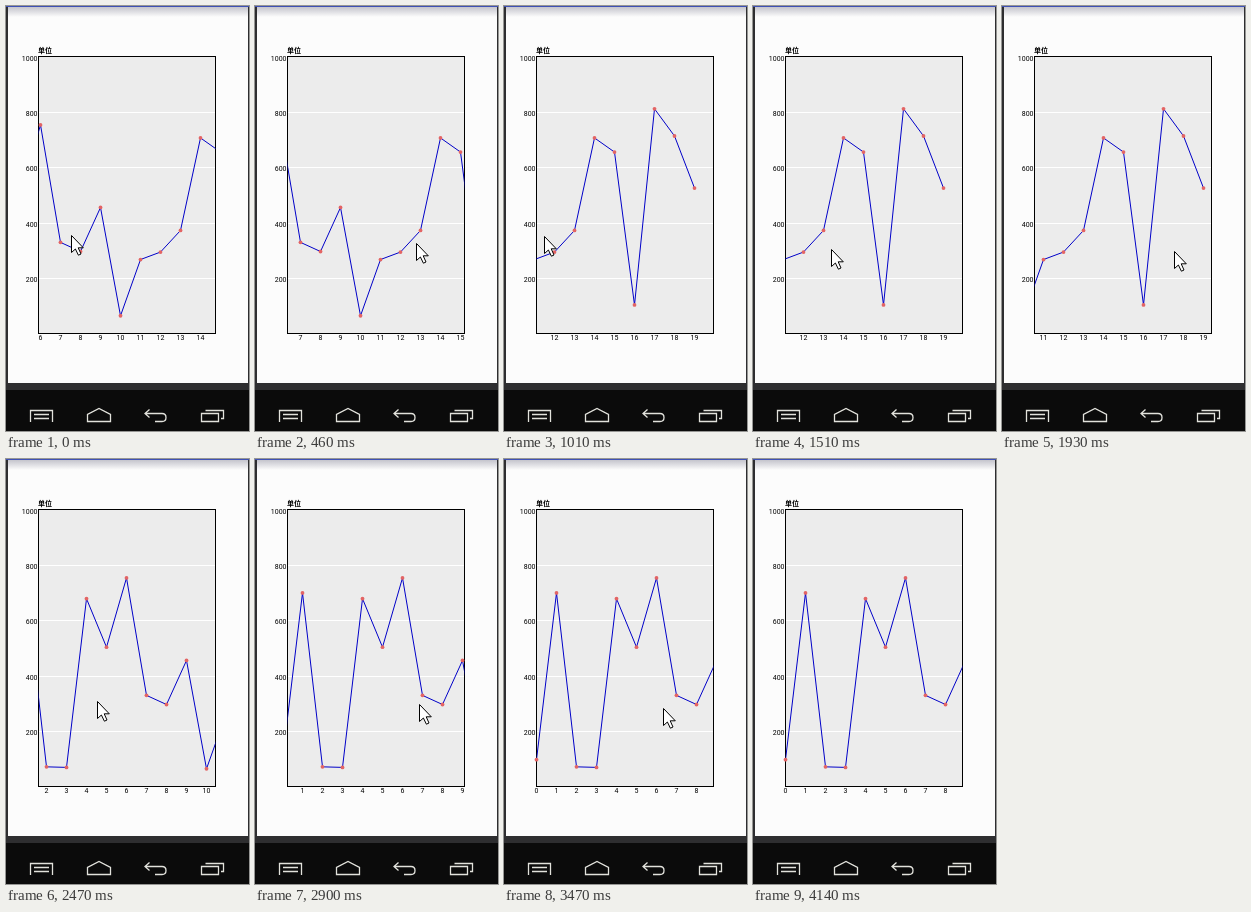
These frames come from a looping animation (243 px wide and 425 px high, 5590 ms). An HTML page with a canvas:

```html
<!DOCTYPE html>
<html lang="zh">
<head>
<meta charset="utf-8">
<title>Scrolling line chart</title>
<style>
  html, body { margin: 0; width: 100%; height: 100%; overflow: hidden; background: #0b0b0b; }
  canvas { display: block; }
</style>
</head>
<body>
<canvas id="stage" width="243" height="425"></canvas>
<script>
const ctx = document.getElementById('stage').getContext('2d');
const LOOP = 5590;
const STEP = 137; // the screen refreshes in steps of this many ms
const POINTER_GONE = 30;
const PLOT = { left: 32.5, top: 50.5, right: 209.5, bottom: 327.5 };
const SPACING = 20;

// The plotted data, one value per x label
const VALUES = [97, 699, 71, 69, 678, 503, 753, 329, 296, 455,
                64, 267, 294, 372, 706, 655, 103, 811, 713, 525];

// Key poses: [step, x of the first data point] and [step, tip x, tip y]
const SCROLL = [[0, -86], [3, -95], [5, -95], [7, -190], [13, -190], [14, -179], [18, 0], [22, 32]];
const POINTER = [
  [0, 65, 229], [3, 161, 237], [7, 40, 230], [9, 105, 242], [11, 78, 243], [14, 172, 245],
  [15, 220, 245], [18, 91, 242], [23, 203, 247], [25, 159, 249], [27, 132, 249], [29, 182, 380]
];

const ARROW = new Path2D('M.5.5V17.5L4.4 14L7.4 20.2L10 19L7.2 12.8H12.3Z');
const NAV_ICONS = new Path2D(
  'M24.5 416V404.5H46.5V416M28 408.5H43M28 412.5H43' +
  'M81.5 415.5V408.5L93 402.5L104.5 408.5V415.5Z' +
  'M143.5 403.5L139 407.5L143.5 411.5M139 407.5H156Q160 407.5 160 411.5T156 415.5H149' +
  'M195.5 407.5H212.5V415.5H195.5ZM199.5 404.5H217.5V412.5H215');

const smooth = u => u * u * (3 - 2 * u);
const yOf = value => PLOT.bottom - value * (PLOT.bottom - PLOT.top) / 1000;

// Eased position between the two key poses around a step
function poseAt(keys, step) {
  const next = keys.findIndex(key => key[0] > step);
  if (next < 0) return keys.at(-1).slice(1);
  const [start, ...from] = keys[next - 1];
  const [end, ...to] = keys[next];
  const u = smooth((step - start) / (end - start));
  return from.map((value, i) => Math.round(value + (to[i] - value) * u));
}

function rect(x, y, w, h, color) {
  ctx.fillStyle = color;
  ctx.fillRect(x, y, w, h);
}

function label(text, x, y, align, weight = 400) {
  ctx.font = `${weight} 7px Roboto, "Noto Sans CJK SC", "Noto Sans CJK", sans-serif`;
  ctx.textAlign = align;
  ctx.fillStyle = '#000';
  ctx.fillText(text, x, y);
}

function drawDevice() {
  rect(0, 0, 243, 425, '#2e2e30');
  rect(2, 0, 240, 377, '#fcfcfc');
  const shadow = ctx.createLinearGradient(0, 1, 0, 11);
  shadow.addColorStop(0, '#c4c4cc');
  shadow.addColorStop(1, '#fcfcfc');
  rect(2, 1, 240, 10, shadow);
  rect(0, 0, 243, 1, '#3f51b5');
  rect(0, 384, 243, 41, '#0b0b0b');
  ctx.strokeStyle = '#e2e2dc';
  ctx.lineWidth = 1.3;
  ctx.stroke(NAV_ICONS);
}

function drawChart(origin) {
  const { left, top, right, bottom } = PLOT;
  const frame = [left, top, right - left, bottom - top];
  rect(...frame, '#ececec');
  for (let value = 200; value <= 1000; value += 200) {
    const y = Math.round(yOf(value));
    if (value < 1000) rect(left, y, right - left, 1, '#fff');
    label(value, 31.5, y + (value < 1000 ? 4 : 3.5), 'right');
  }
  label('单位', 32, 47, 'left', 700);
  ctx.strokeStyle = '#000';
  ctx.lineWidth = 1;
  ctx.strokeRect(...frame);

  const points = VALUES.map((value, i) => [origin + .5 + i * SPACING, yOf(value)]);
  ctx.save();
  ctx.beginPath();
  ctx.rect(...frame);
  ctx.clip();
  ctx.beginPath();
  points.forEach(([x, y]) => ctx.lineTo(x, y));
  ctx.strokeStyle = '#0000c8';
  ctx.stroke();
  ctx.restore();

  points.forEach(([x, y], i) => {
    if (x < left || x > right) return;
    ctx.beginPath();
    ctx.arc(x, y, 1.9, 0, 2 * Math.PI);
    ctx.fillStyle = '#e36464';
    ctx.fill();
    label(i, x, 334, 'center');
  });
}

function drawPointer(x, y) {
  ctx.save();
  ctx.translate(x, y);
  ctx.fillStyle = '#fff';
  ctx.strokeStyle = '#000';
  ctx.lineWidth = 1;
  ctx.fill(ARROW);
  ctx.stroke(ARROW);
  ctx.restore();
}

function render() {
  const step = Math.floor(performance.now() % LOOP / STEP);
  drawDevice();
  drawChart(...poseAt(SCROLL, step));
  if (step < POINTER_GONE) drawPointer(...poseAt(POINTER, step));
  requestAnimationFrame(render);
}
render();
</script>
</body>
</html>
```
